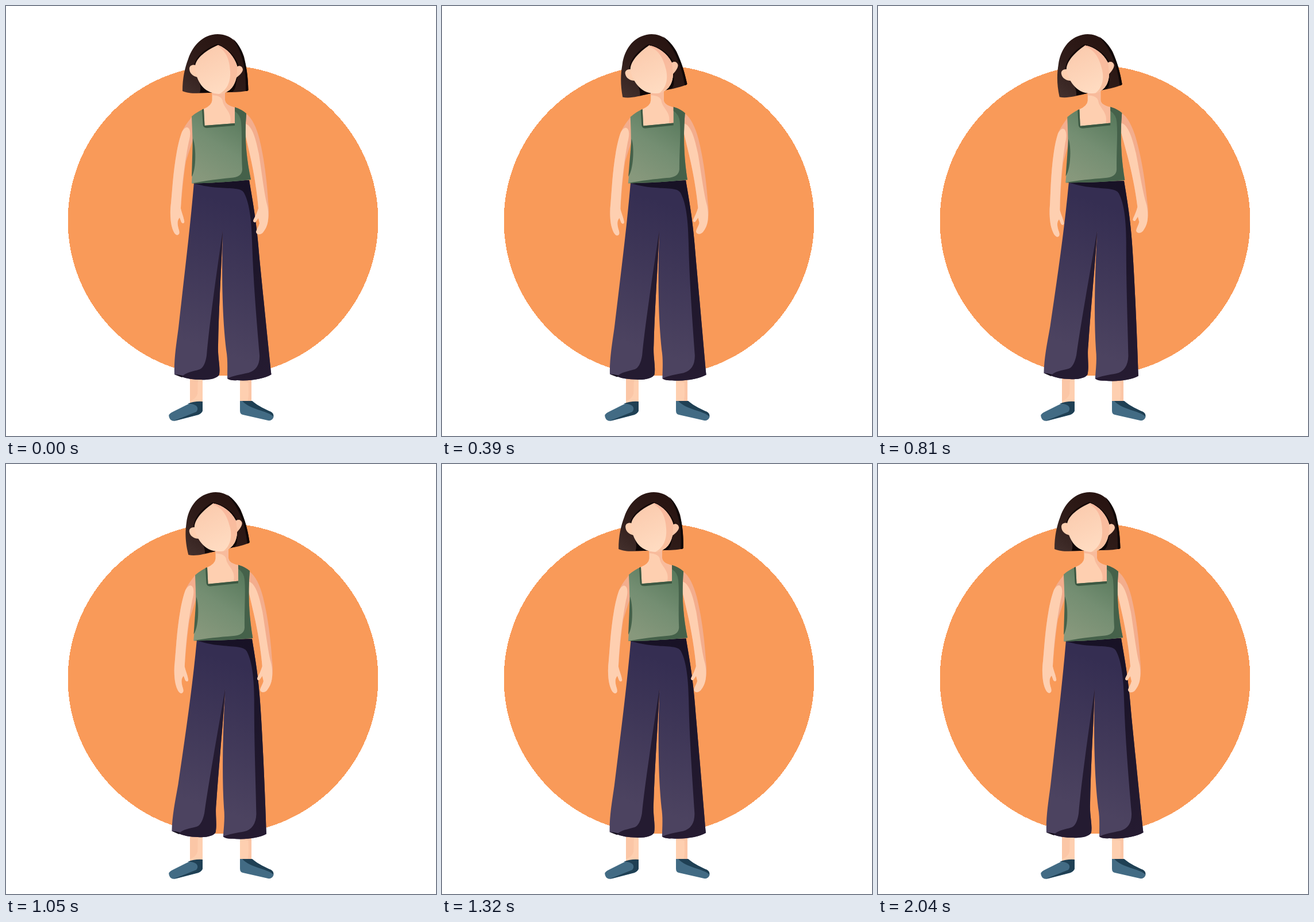
These frames come from a looping animation (748x748 px, 2.7 s). An HTML page:

```html
<!DOCTYPE html>
<html lang="en">
<head>
<meta charset="utf-8">
<title>Head tilt</title>
<style>
  html, body { margin: 0; width: 100%; height: 100%; overflow: hidden; background: #fff; }
  svg { display: block; width: 100vw; height: 100vh; }
</style>
</head>
<body>
<svg id="stage" viewBox="0 0 748 748">
  <defs>
    <linearGradient id="hairFill" gradientUnits="userSpaceOnUse" x1="312" y1="150" x2="385" y2="55">
      <stop offset="0" stop-color="#422f2c"/><stop offset=".45" stop-color="#2f1c19"/><stop offset="1" stop-color="#281411"/>
    </linearGradient>
    <linearGradient id="faceFill" gradientUnits="userSpaceOnUse" x1="345" y1="75" x2="380" y2="150">
      <stop offset="0" stop-color="#fbcbae"/><stop offset="1" stop-color="#ffdcc2"/>
    </linearGradient>
    <linearGradient id="faceShade" gradientUnits="userSpaceOnUse" x1="375" y1="75" x2="385" y2="152">
      <stop offset="0" stop-color="#f9b89d"/><stop offset="1" stop-color="#f9c19f"/>
    </linearGradient>
    <linearGradient id="topFill" gradientUnits="userSpaceOnUse" x1="340" y1="300" x2="410" y2="190">
      <stop offset="0" stop-color="#87987c"/><stop offset=".5" stop-color="#748e72"/><stop offset="1" stop-color="#58795c"/>
    </linearGradient>
    <linearGradient id="pantsFill" gradientUnits="userSpaceOnUse" x1="410" y1="350" x2="330" y2="590">
      <stop offset="0" stop-color="#352e52"/><stop offset=".4" stop-color="#3e3657"/><stop offset="1" stop-color="#4c4360"/>
    </linearGradient>
    <linearGradient id="pantsShade" gradientUnits="userSpaceOnUse" x1="400" y1="310" x2="400" y2="645">
      <stop offset="0" stop-color="#181226"/><stop offset="1" stop-color="#251b31"/>
    </linearGradient>
  </defs>
  <circle cx="377.5" cy="373.2" r="270" fill="#f99a59" shape-rendering="crispEdges"/>
</svg>
<script>
const LOOP = 2700, STEP = 30;
const skin = '#fecfb0', skinShade = '#f3ad8d', legShade = '#fbc6a6';
const green = '#45614a', blue = '#426b84', navy = '#1f4054';

// Pairs of time and value; everything is at rest outside the listed span.
const tracks = {
  tilt:  [240,0, 300,4, 345,8.8, 390,10.7, 570,10.7, 1170,10.7, 1230,6.5, 1275,2, 1320,0],
  chest: [240,0, 390,4.7, 570,6.4, 1050,6, 1170,5.8, 1320,2, 1530,.2, 1860,0],
  hips:  [240,0, 390,.22, 570,.8, 780,1, 1050,1, 1170,.9, 1320,.3, 1530,0],
  arms:  [240,0, 390,.011, 570,.05, 660,.054, 795,.042, 1050,.005, 1320,.006, 1530,.006, 1860,0],
  hairL: [240,0, 320,3, 390,0, 570,-7, 780,1, 1050,3, 1170,2, 1240,-3, 1320,0, 1420,3, 1530,2, 1740,-1, 1890,.7, 2040,0],
  hairR: [240,0, 320,3, 390,0, 570,-5, 780,-2, 1050,-3, 1240,-5, 1320,-2, 1420,1, 1530,-1, 1740,-.5, 1890,.5, 2040,0]
};

// Cubic through the keys, flat at every turning point.
function sample(keys, t) {
  const n = keys.length / 2, T = i => keys[2 * i], V = i => keys[2 * i + 1];
  if (t <= T(0) || t >= T(n - 1)) return 0;
  let i = 0;
  while (T(i + 1) <= t) i++;
  const rate = k => (V(k + 1) - V(k)) / (T(k + 1) - T(k));
  const slope = k => {
    if (k === 0 || k === n - 1) return 0;
    const a = rate(k - 1), b = rate(k);
    return a * b > 0 ? 2 * a * b / (a + b) : 0;
  };
  const h = T(i + 1) - T(i), u = (t - T(i)) / h, v = 1 - u;
  return V(i) * (1 + 2 * u) * v * v + V(i + 1) * u * u * (3 - 2 * u)
       + h * (slope(i) * u * v * v - slope(i + 1) * u * u * v);
}

const warps = {
  still: (x, y) => [x, y],
  head(x, y, p) {
    const a = p.tilt * Math.PI / 180, dx = x - 367, dy = y - 112;
    return [
      367 - p.tilt * .08 + p.chest * .08 + dx * Math.cos(a) + dy * Math.sin(a),
      112 + dy * Math.cos(a) - dx * Math.sin(a)
    ];
  },
  hair(x, y, p) {
    const drop = Math.max(0, (y - 70) / 78) ** 2, side = (x - 307) / 114;
    return warps.head(x + drop * (p.hairL * (1 - side) + p.hairR * side), y, p);
  },
  // The waist follows the hips, the chest leans the other way.
  torso(x, y, p) {
    const k = Math.max(0, Math.min(1, (305 - y) / 70)), low = p.hips * 3.2;
    return [
      x + low + (p.chest - low) * k,
      y + (x - 377) * (p.hips * .025 * (1 - k) - p.chest * .004 * k)
    ];
  },
  arm: (x, y, p) => [x + p.chest + p.arms * (y - 200), y - p.arms * (x - 377)],
  pants(x, y, p) {
    const bend = ((y - 305) / 335) ** 2, side = (x - 377) / 84;
    return [x + p.hips * (5 - 11.5 * bend - 2 * side * bend), y + p.hips * 2.5 * side];
  }
};

const pantsEdge = 'C430,345 436,375 441,440 C447,500 456,590 461.5,641 C450,648 424,653 402,651 Q391,652 385,648';
const innerLeg = 'C374,470 370,525 369,590 C368,612 373,625 371,641 C368,648 352,651 340,650 Q318,650 306,645';
const armLeft = 'M323,193 C318,200 311,208 307,217 C298,240 293,275 290,308 L287,343 C285,358 286,373 288,382 C290,390 293,398 298,398.5 C302,398 302,394 301,390 C298,381 298,375 300,371 L302,368 L305,376 C308,380 311,377 310,374 C309,367 306,361 304,352 C306,325 309,295 313,270 L325,233Z';
const armRight = 'M417,187 C428,194 436,212 441,232 C449,265 454,305 456,340 C457,350 458,360 456,372 C455,382 451,389 447,394 C442,399 436,398 435,393 C436,388 440,383 441,378 L439,369 L434,376 C431,377 429,375 431,371 C434,365 437,359 439,352 C437,325 431,288 425,262 L416,222Z';

const shapes = [
  ['still', skin, 'M320,638 L342,638 L342,692 L320,692Z'],
  ['still', legShade, 'M320,638 L342,638 L342,646 C330,646 335,660 333,675 Q330,684 320,687Z'],
  ['still', skin, 'M407,638 L427,638 L427,692 L407,692Z'],
  ['still', legShade, 'M407,638 L427,638 L427,690 L420,690 C424,675 421,662 422,655 L407,652Z'],
  ['still', blue, 'M342,688 L342,704 Q341,708 335,711 L297,721 Q287,724 284,716 Q281,710 290,706 L312,695 Q324,688 342,688Z'],
  ['still', navy, 'M316,692 Q328,687 342,688 L342,704 Q340,709 334,711 L291,722 L331,706 C337,699 331,691 316,692Z'],
  ['still', blue, 'M407,687 L428,687 C440,697 452,702 461,706 Q466,709 465.500,715 Q463,722 456,721 L412,711 Q407,710 407,704Z'],
  ['still', navy, 'M411,687 L428,687 C440,697 452,702 461,706 Q466,709 465,714 C455,704 424,702 411,687Z'],

  ['pants', 'url(#pantsFill)', `M327,307 L423,303 ${pantsEdge} C385,630 386,615 383,598 C376,540 375,470 377,391 ${innerLeg} L293,641 C292,615 296,590 300,560 C310,470 320,390 327,307Z`],
  ['pants', 'url(#pantsShade)', `M327,307 L423,303 ${pantsEdge} C395,643 408,641 422,638 Q442,632 441,607 C437,560 430,480 428,410 C427,365 422,340 414,325 C409,316 393,318 370,316 C350,315 337,311 327,309Z`],
  ['pants', '#241b31', `M377,391 ${innerLeg} C312,637 325,636 337,632 Q346,628 349,608 C353,560 364,480 377,391Z`],
  ['pants', '#17111f', 'M293,641 Q300,641 308,643 L306,646Z'],

  ['arm', skinShade, armLeft],
  ['arm', skin, 'M314,211 C321,211 322,222 318,236 C311,270 306,310 304,352 C306,361 309,367 310,374 C311,377 308,380 305,376 L302,368 L300,371 C298,375 298,381 301,390 C302,394 302,398 298,398.5 C293,398 290,390 288,382 C286,373 285,358 287,343 L290,308 C293,275 298,240 306,219 Q310,212 314,211Z'],
  ['arm', skinShade, armRight],
  ['arm', skin, 'M416,222 L417,205 C429,209 435,233 440,258 C445,290 449,325 454,345 C456,352 457,362 456,372 C455,382 451,389 447,394 C442,399 436,398 435,393 C436,388 440,383 441,378 L439,369 L434,376 C431,377 429,375 431,371 C434,365 437,359 439,352 C437,325 431,288 425,262Z'],

  ['hair', 'url(#hairFill)', 'M307,148 C307,125 311,108 317,92 C325,68 343,49.5 368,49 C392,49 407,66 414,88 C419,108 421,128 421.500,146 Q421,148 417,148 C405,150 395,150 386,150 L352,151 C335,152 318,153 307,148Z'],
  ['hair', '#100707', 'M395,57 C406,67 412,82 415,95 C420,112 421,130 421.500,146 Q421,148 417,148 C418,120 414,85 395,57Z'],
  ['hair', '#100707', 'M330,120 C338,132 340,143 337,151 L352,151 L386,150 L394,149 C401,144 399,134 404,118 L380,115Z'],
  ['hair', '#140908', 'M368,66 C346,74 330,88 327,104 L333,106 L369,72 L401,106 L405,104 C400,88 387,74 368,66Z'],

  ['torso', skin, 'M358.500,143 L358.500,164 Q358,173 344,179 L343,212 L400,208 L400,177 Q382,173 381,164 L381,143Z'],
  ['torso', '#f8bb9c', 'M358.500,143 L381,143 L381,164 Q382,173 400,177 L400,208 L389,208 C396,186 380,180 377,166 Q376,156 358.500,155Z'],
  ['torso', 'url(#topFill)', 'M323,192 C330,186 337,182 344,179 L345.500,208 L398,204 L398,176 Q410,180 418,187 C415,225 417,260 426,302 C400,305 360,308 323,308.500 L325,270 C325,240 324,215 323,192Z'],
  ['torso', green, 'M398,176 Q410,180 418,187 C415,225 417,260 426,302 C400,305 360,308 323,308.500 C345,304 370,301 390,299 Q411,298 411,284 C409,250 411,225 409,202 Q408,190 398,183Z'],
  ['torso', green, 'M325,230 C331,245 331,285 323,297Z'],
  ['torso', '#3c5842', 'M341,180 L344,179 L345.500,208 L398,204 L398,208 L351,212 Q343,213 342.500,206Z'],

  ['head', skin, 'M332,104 C327,101 319,102 319,109 C319,117 325,122 333,124Z'],
  ['head', '#fcc6a8', 'M400,107 C404,102 412,104 412,111 C411,117 404,122 399,126Z'],
  ['head', 'url(#faceFill)', 'M369,68 C385,74 397,88 402,104 C403,120 400,133 393,142 Q385,152 371,153 C352,152 342,143 336,132 C331,123 329,112 329,105 C330,90 350,76 369,68Z'],
  ['head', 'url(#faceShade)', 'M367,69 L369,68 C385,74 397,88 402,104 C403,120 400,133 393,142 Q385,152 371,153 C385,146 391,131 390,114 C389,93 383,78 367,69Z']
];

const stage = document.getElementById('stage');
const parts = shapes.map(([warp, fill, d]) => {
  const node = document.createElementNS('http://www.w3.org/2000/svg', 'path');
  node.setAttribute('fill', fill);
  node.setAttribute('d', d);
  stage.append(node);
  return { node, d, warp: warps[warp] };
});

function draw(t) {
  const pose = {};
  for (const name in tracks) pose[name] = sample(tracks[name], t);
  for (const { node, d, warp } of parts) {
    if (warp === warps.still) continue;
    node.setAttribute('d', d.replace(/([\d.]+),([\d.]+)/g,
      (_, x, y) => warp(+x, +y, pose).map(v => v.toFixed(2)).join(',')));
  }
}

const start = performance.now();
let last = -1;
function tick() {
  const t = Math.floor((performance.now() - start) % LOOP / STEP) * STEP;
  if (t !== last) draw(last = t);
  requestAnimationFrame(tick);
}
tick();
</script>
</body>
</html>
```
